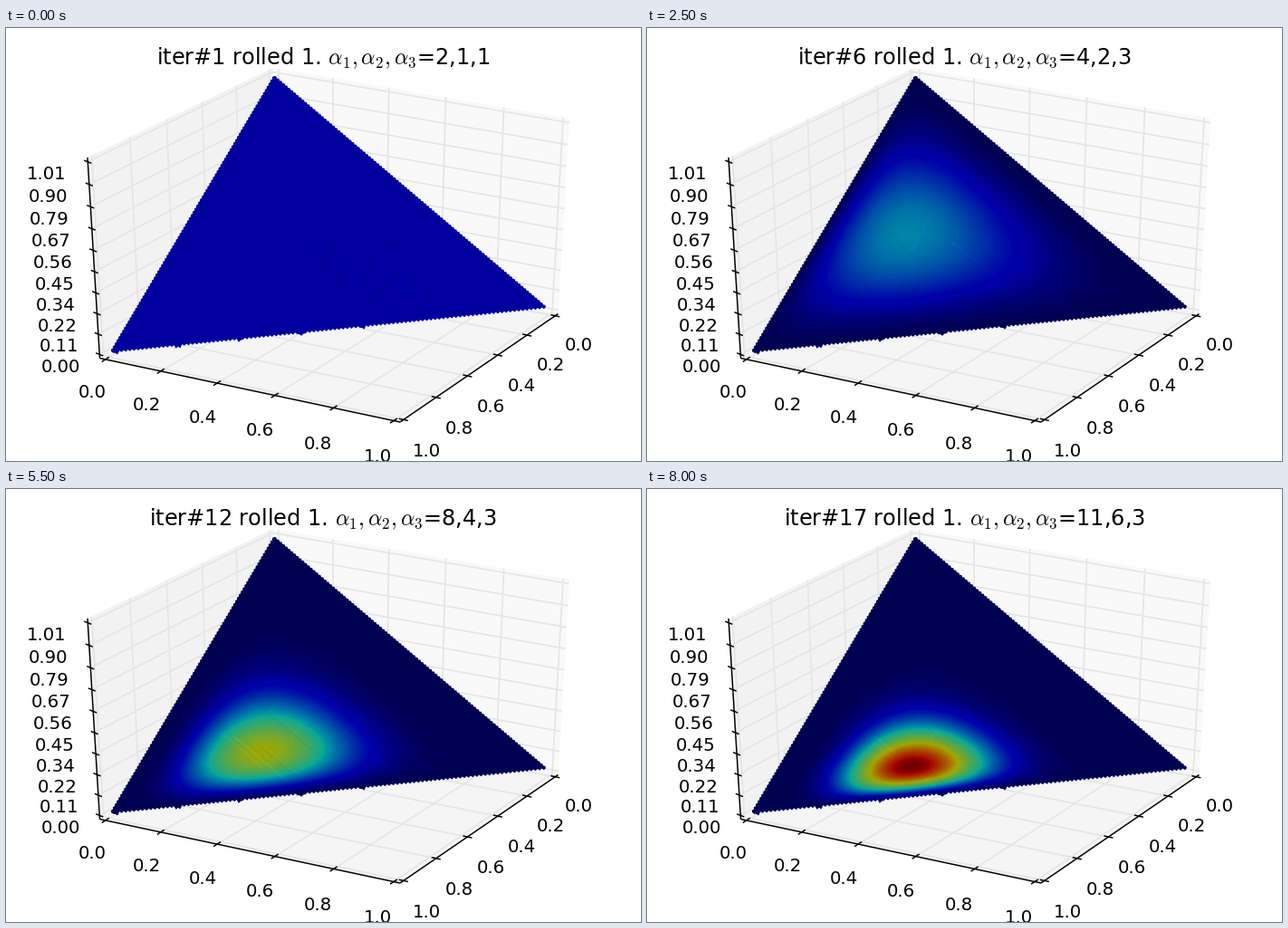
Animation of 701 by 478 pixels, one loop 8500 ms. Source, as a matplotlib script:

```python
import math

import matplotlib
import matplotlib.pyplot as plt
import numpy as np
from matplotlib.animation import FuncAnimation
from matplotlib.patches import Polygon

W, H, DPI = 701, 478, 128
ROLLS = [1, 2, 3, 1, 3, 1, 2, 1, 2, 1, 1, 1, 1, 2, 1, 2, 1]
VMAX, SHADE = 20, 0.655
GRID = "#e5e5e5"

plt.rcParams["font.family"] = "DejaVu Sans"
plt.rcParams["mathtext.fontset"] = "cm"

fig = plt.figure(figsize=(W / DPI, H / DPI), dpi=DPI, facecolor="white")
ax = fig.add_axes([0, 0, 1, 1])
ax.axis("off")


def px(size):
    return size * 72 / DPI


def corner(x, y, depth):
    """Screen point in homogeneous form, so that mixing keeps perspective."""
    return np.array([x, y, 1.0]) * depth


def flat(p):
    return p[:2] / p[2]


def mix(a, b, t):
    return flat(a + (b - a) * t)


def line(p, q, color, width, z):
    ax.plot([p[0], q[0]], [p[1], q[1]], color=color, lw=px(width), zorder=z,
            solid_capstyle="butt")


def tick(p, half, offset, text):
    """Small mark centred on p, and its label at an offset from it."""
    line(p - half, p + half, "black", 1.5, 5)
    ax.text(*(p + offset), text, fontsize=px(19.7), ha="center",
            va="center_baseline", zorder=6)


def inset(u):
    """Place of a data value on an axis with a margin at both ends."""
    return (u + 1 / 48) / (1 + 1 / 24)


# Box corners: the floor and the tops of three of them
left, near = corner(103.5, 364.5, 8.09), corner(435, 435, 7.66)
right, back = corner(609.5, 315.5, 8.41), corner(297.5, 257, 8.84)
left_top, right_top = corner(90, 143, 7.59), corner(622, 100, 7.91)
back_top = corner(294.5, 44, 8.34)

for pane, tone in [((left, back, back_top, left_top), 0.95),
                   ((back, right, right_top, back_top), 0.975),
                   ((left, near, right, back), 0.9625)]:
    ax.add_patch(Polygon([flat(p) for p in pane], fc=str(tone), ec="none",
                         zorder=1))

for u in np.linspace(0, 1, 6):
    t = inset(u)
    # each grid line crosses the floor, then climbs the wall behind
    p, q = mix(left, near, t), mix(back, right, t)
    line(p, q, GRID, 1.7, 2)
    line(q, mix(back_top, right_top, t), GRID, 1.7, 2)
    tick(p, np.array([4, -2.6]), (-14.5 - 3.5 * u, 35 + 3.4 * u), f"{u:.1f}")

    p, q = mix(right, near, t), mix(back, left, t)
    line(p, q, GRID, 1.7, 2)
    line(q, mix(back_top, left_top, t), GRID, 1.7, 2)
    tick(p, np.array([5, 1.1]), (26, 31 + 2.5 * u), f"{u:.1f}")

for u in np.linspace(0, 1, 10):
    t = inset(u)
    p, q = mix(left, left_top, t), mix(back, back_top, t)
    line(p, q, GRID, 1.7, 2)
    line(q, mix(right, right_top, t), GRID, 1.7, 2)
    tick(p, np.array([4, 1.6]), (-43 - 3 * u, 12), f"{1.01 * u:.2f}")

for a, b in [(left, near), (near, right), (left, left_top)]:
    line(flat(a), flat(b), "black", 1.5, 4)

# Simplex surface, coloured by barycentric coordinates in the order 1, 2, 3
A, B, C = corner(116, 357, 8.09), corner(296, 53, 8.34), corner(596, 308, 8.41)
X0, Y0, X1, Y1 = 112, 48, 602, 364
CELL = 3  # each facet takes the value of its upper corner
gx, gy = np.meshgrid(np.arange(X0, X1) + 0.5, np.arange(Y0, Y1) + 0.5)
bary = np.linalg.inv(np.column_stack([A, C, B])) @ np.stack(
    [gx.ravel(), gy.ravel() - CELL, np.ones(gx.size)])
bary = np.clip(bary / bary.sum(axis=0), 0, 1).reshape(3, *gx.shape)


def streaked_shade(seed=4):
    """Even shade with faint facet streaks parallel to two of the sides."""
    rng = np.random.default_rng(seed)
    shade = np.full(gx.shape, SHADE)
    for axis, count, longest in [(0, 16, 0.5), (1, 12, 0.2)]:
        for _ in range(count):
            place = rng.uniform(0.05, 0.6)
            top = rng.uniform(0.2, 0.85) * (1 - place)
            end = top - rng.uniform(0.3, 1) * longest
            ridge = np.exp(-((bary[axis] - place) / 0.003) ** 2)
            within = (bary[2] < top) & (bary[2] > end)
            shade += rng.uniform(-0.03, 0.06) * ridge * within
    return shade


def saw_edge(a, b, step, height):
    """Points from a to b with small teeth on the outer side."""
    a, b = flat(a), flat(b)
    d = b - a
    length = np.hypot(*d)
    i = np.arange(2 * int(length / step))[:, None]
    out = np.array([d[1], -d[0]]) / length
    return a + d * i / len(i) + out * height * (i % 2)


bottom = saw_edge(C, A, 4.6, 2)
x = bottom[:, 0]
bottom[(x < 402) & ((x - 187) % 68 < 6), 1] += 2.2  # evenly spaced bumps
clip = Polygon(np.vstack([saw_edge(A, B, 4, 1.2), saw_edge(B, C, 4, 1.2),
                          bottom]), fc="none", ec="none")
ax.add_patch(clip)

shade = streaked_shade()
surface = ax.imshow(np.zeros((*gx.shape, 3)), extent=(X0, X1, Y1, Y0),
                    interpolation="nearest", aspect="auto", zorder=3)
surface.set_clip_path(clip)
ax.set_xlim(0, W)
ax.set_ylim(H, 0)

title = ax.text(350.3, 40, "", fontsize=px(24), ha="center", va="baseline",
                zorder=6)
jet = matplotlib.colormaps["jet"]


def counts(n):
    return [1 + ROLLS[:n].count(k) for k in (1, 2, 3)]


def density(alpha):
    value = math.gamma(sum(alpha)) * np.ones(gx.shape)
    for a, p in zip(alpha, bary):
        value *= p ** (a - 1) / math.gamma(a)
    return value


def update(i):
    # the surface is the belief before the roll, the title the one after it
    rgb = jet(density(counts(i)) / VMAX)[..., :3] * shade[..., None]
    surface.set_data(np.clip(rgb, 0, 1))
    alpha = ",".join(map(str, counts(i + 1)))
    title.set_text(f"iter#{i + 1} rolled {ROLLS[i]}. "
                   rf"$\alpha_1,\alpha_2,\alpha_3$={alpha}")
    return surface, title


anim = FuncAnimation(fig, update, frames=len(ROLLS), interval=500, repeat=True,
                     repeat_delay=0)
plt.show()
```
